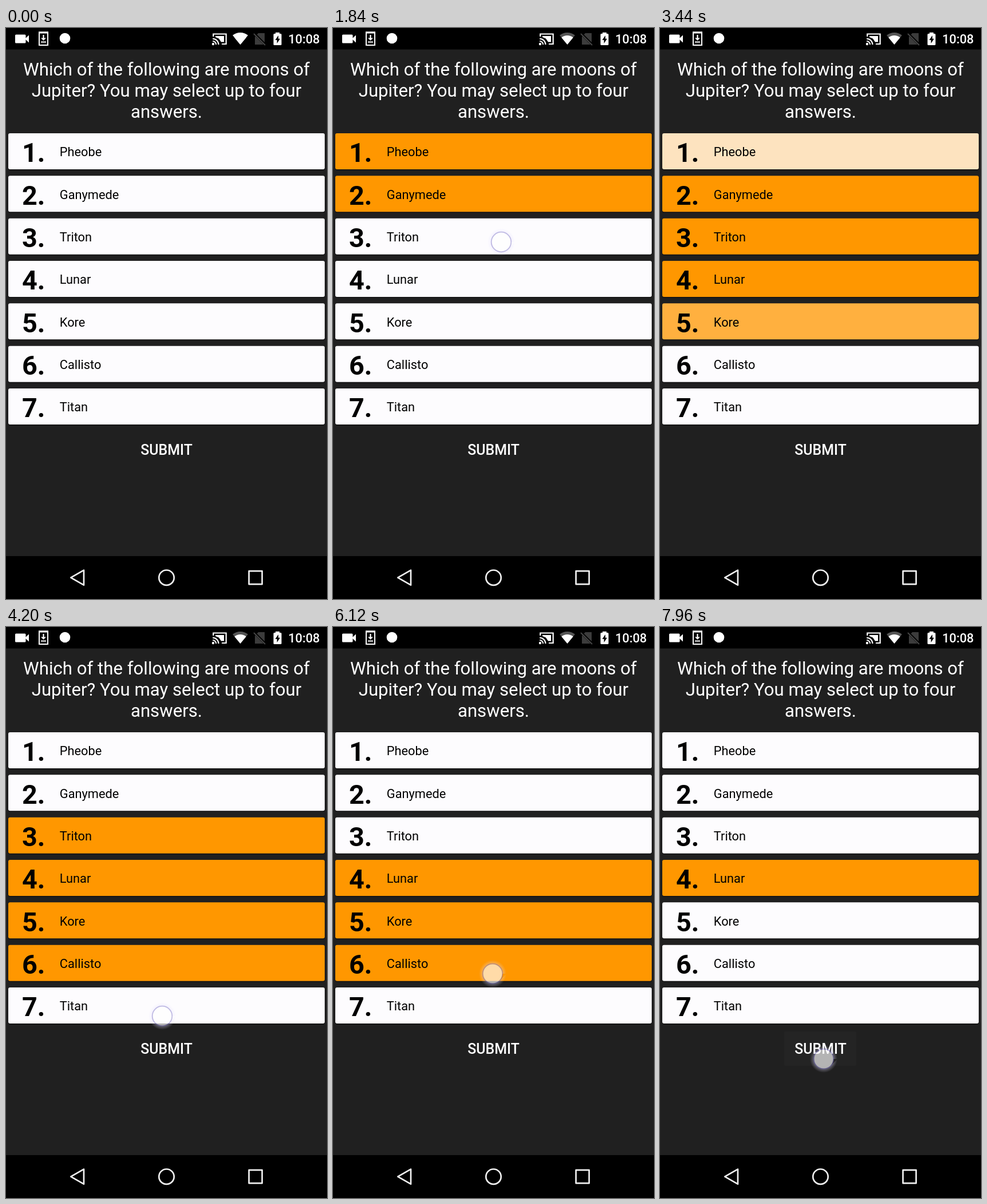
An HTML page with a canvas that plays this animation: 561x998 px, repeating every 8 s.

```html
<!DOCTYPE html>
<html lang="en">
<head>
<meta charset="utf-8">
<title>Quiz</title>
<style>
  html, body { margin: 0; width: 100%; height: 100%; overflow: hidden; background: #000; }
  canvas { display: block; width: 561px; height: 998px; }
</style>
</head>
<body>
<canvas id="stage" width="561" height="998"></canvas>
<script>
const ctx = document.getElementById('stage').getContext('2d');
const LOOP = 8000, FADE = 360, DOT_FADE = 140;
const WHITE = [253, 252, 254], ORANGE = [255, 151, 0];
const title = ['Which of the following are moons of', 'Jupiter? You may select up to four', 'answers.'];
const answers = ['Pheobe', 'Ganymede', 'Triton', 'Lunar', 'Kore', 'Callisto', 'Titan'];

// x, y, press and release times, row switched on, row switched off
const taps = [
  { x: 292, y: 224, down: 560, up: 720, on: 1 },
  { x: 293, y: 299, down: 1200, up: 1420, on: 2 },
  { x: 294, y: 374, down: 1800, up: 2000, on: 3 },
  { x: 295, y: 450, down: 2380, up: 2600, on: 4 },
  { x: 287, y: 520, down: 2980, up: 3200, on: 5, off: 1 },
  { x: 279, y: 583, down: 3620, up: 3800, on: 6, off: 2 },
  { x: 273, y: 680, down: 4180, up: 4400, on: 7, off: 3 },
  { x: 275, y: 669, down: 5590, up: 5720, off: 7 },
  { x: 279, y: 606, down: 6100, up: 6280, off: 6 },
  { x: 282, y: 510, down: 6660, up: 6800, off: 5 },
  { x: 286, y: 755, down: 7840, up: 8200 }
];

const clamp = v => Math.max(0, Math.min(1, v));
const ease = v => 0.5 - Math.cos(Math.PI * clamp(v)) / 2;

function text(str, x, y, size, weight, color, align = 'left') {
  ctx.font = `${weight} ${size}px Roboto, sans-serif`;
  ctx.textAlign = align;
  ctx.fillStyle = color;
  ctx.fillText(str, x, y);
}

function roundBox(x, y, w, h, r, color) {
  ctx.fillStyle = color;
  ctx.beginPath();
  ctx.roundRect(x, y, w, h, r);
  ctx.fill();
}

function poly(points, color) {
  ctx.fillStyle = color;
  ctx.beginPath();
  points.forEach(([x, y]) => ctx.lineTo(x, y));
  ctx.closePath();
  ctx.fill();
}

function line(points, width, color) {
  ctx.lineWidth = width;
  ctx.strokeStyle = color;
  ctx.beginPath();
  points.forEach(([x, y]) => ctx.lineTo(x, y));
  ctx.stroke();
}

function disc(x, y, r, color) {
  ctx.fillStyle = color;
  ctx.beginPath();
  ctx.arc(x, y, r, 0, 7);
  ctx.fill();
}

function fan(r, color) {
  ctx.fillStyle = color;
  ctx.beginPath();
  ctx.moveTo(409.5, 29);
  ctx.arc(409.5, 29, r, -Math.PI / 2 - 0.69, -Math.PI / 2 + 0.69);
  ctx.fill();
}

function statusBar(t) {
  ctx.fillStyle = '#000';
  ctx.fillRect(0, 0, 561, 37.5);

  // camera
  roundBox(16, 11.5, 18.5, 15, 1.5, '#fff');
  poly([[33, 19], [40, 12.5], [40, 25.5]], '#fff');

  // download
  ctx.lineWidth = 2;
  ctx.strokeStyle = '#fff';
  ctx.strokeRect(58, 7.5, 15, 22.5);
  ctx.fillStyle = '#fff';
  ctx.fillRect(57, 6.5, 17, 3);
  ctx.fillRect(64.4, 12, 2.2, 7);
  poly([[61, 17.5], [70, 17.5], [65.5, 22]], '#fff');
  ctx.fillRect(61, 23.5, 9, 2);

  disc(103, 18, 9.3, '#fff');

  // cast
  line([[362.3, 15], [362.3, 10.5], [384.7, 10.5], [384.7, 28], [377, 28]], 2.2, '#fff');
  poly([[366, 14], [381, 14], [381, 24.5], [376, 24.5], [372, 18.5], [366, 16]], '#fff');
  disc(362, 28, 2.2, '#fff');
  for (const r of [6, 10.3]) {
    ctx.lineWidth = 2.1;
    ctx.strokeStyle = '#fff';
    ctx.beginPath();
    ctx.arc(361.2, 29, r, -Math.PI / 2, 0);
    ctx.stroke();
  }

  // signal
  fan(21, t < 600 ? '#fff' : '#555');
  fan(16, '#fff');

  // missing card
  poly([[441, 9], [452, 9], [452, 29], [435, 29], [435, 15]], '#3c3c3c');
  line([[433, 9], [454, 30]], 4, '#000');
  line([[433, 10], [453, 30]], 1.8, '#484848');

  // battery
  roundBox(467.5, 10, 14, 20, 1.5, '#fff');
  ctx.fillRect(471, 7.8, 7, 3);
  poly([[476, 13], [470.5, 21], [473.6, 21], [473.6, 27], [479, 18.8], [476, 18.8]], '#000');

  text('10:08', 548.5, 27.3, 21.8, 500, '#fff', 'right');
}

function navBar() {
  ctx.fillStyle = '#000';
  ctx.fillRect(0, 923, 561, 75);
  ctx.strokeStyle = '#f0f0f0';
  ctx.lineWidth = 2.7;
  ctx.lineJoin = 'round';
  ctx.beginPath();
  ctx.moveTo(113.3, 960.7);
  ctx.lineTo(136, 947.7);
  ctx.lineTo(136, 973.7);
  ctx.closePath();
  ctx.stroke();
  ctx.beginPath();
  ctx.arc(280.5, 960.7, 13.2, 0, 7);
  ctx.stroke();
  ctx.strokeRect(424.6, 949.2, 23, 23);
  ctx.lineJoin = 'miter';
}

function rowLevel(row, t) {
  let level = 0;
  for (const tap of taps) {
    const step = ease((t - tap.up) / FADE);
    if (tap.on === row) level += step;
    if (tap.off === row) level -= step;
  }
  return level;
}

function drawRow(i, t) {
  const y = 184 + i * 74.33;
  const level = rowLevel(i + 1, t);
  const rgb = WHITE.map((c, k) => Math.round(c + (ORANGE[k] - c) * level));
  roundBox(3.5, y + 1, 554, 64, 4, 'rgba(0,0,0,.3)');
  roundBox(4, y, 553, 63, 3, `rgb(${rgb})`);
  text(`${i + 1}.`, 28, y + 50.3, 46.75, 700, '#000');
  text(answers[i], 93.8, y + 40.4, 21.8, 400, '#000');
}

function drawDot({ x, y, down, up }, t) {
  if (t < down || t >= up + DOT_FADE) return;
  ctx.globalAlpha = 1 - clamp((t - up) / DOT_FADE);
  const glow = ctx.createRadialGradient(x, y, 16, x, y, 24);
  glow.addColorStop(0, 'rgba(225,220,255,.4)');
  glow.addColorStop(1, 'rgba(225,220,255,0)');
  ctx.fillStyle = glow;
  ctx.beginPath();
  ctx.arc(x, y, 24, 0, 7);
  ctx.arc(x, y, 17, 0, 7, true);
  ctx.fill();
  disc(x, y, 16.8, 'rgba(255,255,255,.66)');
  ctx.lineWidth = 1.8;
  ctx.strokeStyle = 'rgba(105,95,185,.4)';
  ctx.beginPath();
  ctx.arc(x, y, 17.3, 0, 7);
  ctx.stroke();
  ctx.globalAlpha = 1;
}

function draw(t) {
  ctx.fillStyle = '#202020';
  ctx.fillRect(0, 0, 561, 998);
  statusBar(t);
  navBar();
  title.forEach((s, i) => text(s, 280.5, 83 + i * 37.1, 31.2, 400, '#fff', 'center'));
  answers.forEach((_, i) => drawRow(i, t));

  const press = clamp((t - 7840) / 160);
  if (press) roundBox(217, 707, 126, 60, 3, `rgba(255,255,255,${0.025 * press})`);
  text('SUBMIT', 280.5, 745.6, 24.9, 500, '#fff', 'center');

  taps.forEach(tap => drawDot(tap, t));
}

const start = performance.now();
function tick() {
  draw((performance.now() - start) % LOOP);
  requestAnimationFrame(tick);
}
tick();
</script>
</body>
</html>
```
